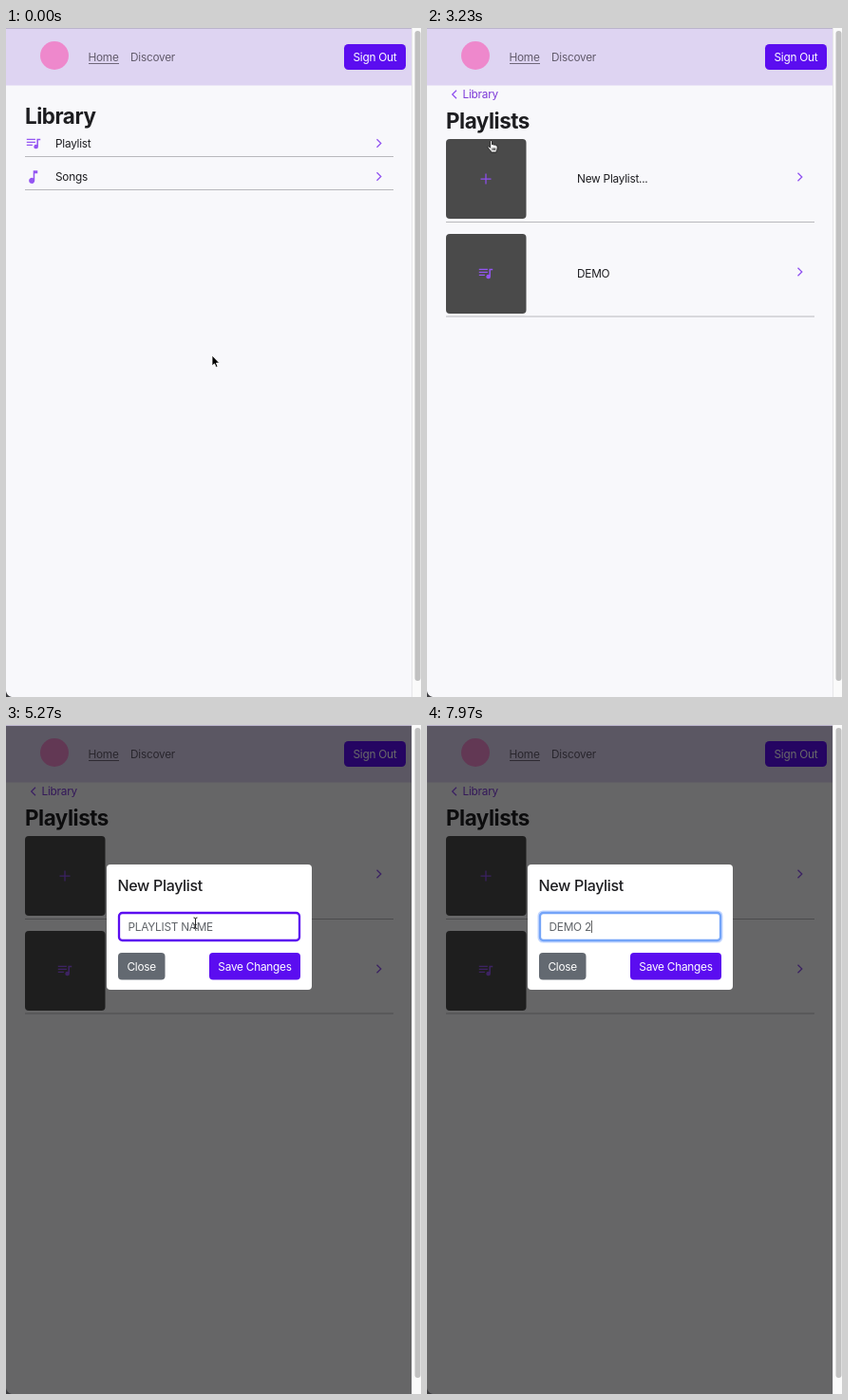
These frames come from a looping animation (437 px wide and 705 px high, 8000 ms). An HTML page:

```html
<!DOCTYPE html>
<html lang="en">
<head>
<meta charset="utf-8">
<title>Music library</title>
<style>
  html, body { margin: 0; width: 100%; height: 100%; overflow: hidden; }
  svg { display: block; width: 437px; height: 705px; }
  text { font: 11.8px Inter, sans-serif; letter-spacing: -.02em; fill: #1d1d20; white-space: pre; }
  .title { font-size: 22.4px; font-weight: 700; }
  .modal-title { font-size: 16px; font-weight: 500; }
  .nav text { fill: #625b6c; }
  text.white { fill: #fff; }
  text.link { fill: #7d3ad8; }
  text.field { fill: #5f6368; }
  .hint { font-size: 10px; }
  .primary { fill: #5b0df0; }
  .icon { fill: #9455f2; }
  .stroke { fill: none; stroke: #8f4ff0; stroke-width: 1.25; }
  .rule { stroke: #b8b8bc; }
  .tile { fill: #4a4a4a; }
</style>
</head>
<body>
<svg viewBox="0 0 437 705">
  <defs>
    <path id="queue" class="icon" transform="scale(.76) translate(-12.5 -13)" d="M15 6H3v1.6h12zM15 10H3v1.6h12zM3 15.6h8V14H3zM17 6v8.2a3 3 0 1 0 2 2.8V8h3V6z"/>
    <path id="note" class="icon" transform="scale(.76) translate(-12 -12)" d="M12 3v10.6a4 4 0 1 0 2 3.4V7h4V3z"/>
    <path id="chevron" class="stroke" d="M-2 -4.3L2.3 0L-2 4.3"/>
    <filter id="shadow" x="-30%" y="-30%" width="160%" height="170%">
      <feDropShadow dx="0" dy="1" stdDeviation="1.5" flood-opacity=".35"/>
    </filter>
  </defs>

  <rect width="437" height="705" fill="#f8f8fb"/>
  <rect width="427" height="60.5" fill="#ded4f2"/>
  <circle cx="51" cy="29" r="15" fill="#ee88cc"/>
  <g class="nav">
    <text x="86.5" y="35">Home</text>
    <path d="M87 37.5H119" stroke="#625b6c" stroke-width=".9"/>
    <text x="131" y="35">Discover</text>
  </g>
  <rect class="primary" x="356" y="17" width="65" height="27" rx="4.5"/>
  <text class="white" x="388.5" y="35" text-anchor="middle">Sign Out</text>

  <g id="library">
    <text class="title" x="20" y="101">Library</text>
    <use href="#queue" x="29" y="122"/>
    <text x="52" y="126">Playlist</text>
    <use href="#chevron" x="392.5" y="121.5"/>
    <path class="rule" d="M20 135.5H408M20 170.5H408"/>
    <use href="#note" x="28.7" y="157"/>
    <text x="52" y="161">Songs</text>
    <use href="#chevron" x="392.5" y="156.5"/>
  </g>

  <g id="playlists">
    <use href="#chevron" transform="translate(29 70) scale(-1 1)"/>
    <text class="link" x="37.5" y="74.3">Library</text>
    <text class="title" x="20" y="105.5">Playlists</text>
    <rect class="tile" x="20" y="117" width="84.5" height="84" rx="4"/>
    <path class="stroke" d="M56.5 159H67.5M62 153.5V164.5"/>
    <text x="158" y="163.4">New Playlist...</text>
    <use href="#chevron" x="392.5" y="157"/>
    <rect class="tile" x="20" y="217" width="84.5" height="84" rx="4"/>
    <use href="#queue" x="62" y="259"/>
    <text x="158" y="263.2">DEMO</text>
    <use href="#chevron" x="392.5" y="257"/>
    <path class="rule" d="M20 204.5H408M20 304H408"/>
  </g>

  <g id="modal">
    <rect width="427" height="705" opacity=".59"/>
    <rect x="106" y="147" width="216" height="132" rx="4" fill="#fff"/>
    <text class="modal-title" x="117.5" y="175">New Playlist</text>
    <rect id="ring" x="116.5" y="195.5" width="195" height="34" rx="5.5" fill="#c2d6ff"/>
    <rect id="input" x="119" y="198" width="190" height="29" rx="3.5" fill="#fff" stroke-width="2.3"/>
    <text id="field" class="field" x="128.5" y="216.7"></text>
    <rect id="caret" y="206" width="1" height="13" fill="#555"/>
    <rect x="118" y="240" width="49.5" height="28.5" rx="4" fill="#636971"/>
    <text class="white" x="142.7" y="258.5" text-anchor="middle">Close</text>
    <rect class="primary" x="214" y="240" width="96" height="28.5" rx="4"/>
    <text class="white" x="262" y="258.5" text-anchor="middle">Save Changes</text>
    <g id="popup">
      <path filter="url(#shadow)" fill="#fff" d="M194 236H201L207 230.5L213 236H242Q245 236 245 239V266Q245 269 242 269H194Q191 269 191 266V239Q191 236 194 236Z"/>
      <text class="hint" x="200.3" y="256">DEMO</text>
    </g>
  </g>

  <path d="M0 .5H427" stroke="#bbb4cc"/>
  <path d="M0 699Q1 704 6 705H0Z" fill="#3a3a3d"/>
  <rect x="427" width="10" height="705" fill="#fafafa"/>
  <path d="M427.5 0V705" stroke="#e6e6e8"/>
  <rect x="430.5" y="3" width="6" height="685" rx="3" fill="#c1c1c1"/>

  <g id="cursor">
    <path id="arrow" d="M0 0V11L2.5 8.8L4.2 12.5L6 11.7L4.4 8.1H7.7Z" fill="#000" stroke="#fff" stroke-width=".8"/>
    <path id="hand" d="M-.9 6V1Q0 -.5 1 1V4.4Q2.2 3.6 3 4.8Q4.2 4.1 4.9 5.3Q6.6 4.8 6.6 6.5V8.5Q6.4 10 5.6 11V12.4H-.2V11.2Q-2 9.6-3.5 7.2Q-3.2 5.5-1.8 6.8L-.9 7.8ZM1.4 7.8V10.5M2.9 7.8V10.5M4.4 7.8V10.5" fill="#fff" stroke="#111" stroke-width=".8" stroke-linejoin="round"/>
    <path id="beam" d="M-2 -5.5Q0 -5.5 0 -4.2Q0 -5.5 2 -5.5M0 -4.5V5M-2 6Q0 6 0 4.7Q0 6 2 6M-1.3 1.8H1.3" fill="none" stroke="#222" stroke-width="1"/>
  </g>
</svg>
<script>
const LOOP = 8000;
const OPEN_LIST = 2900, OPEN_MODAL = 4570, FOCUS = 5750, SUGGEST = 5900, TYPE = 6900, KEY = 200;
const WORD = 'DEMO 2';

// start, end, destination of each pointer move
const START = [217, 345];
const MOVES = [
  [1530, 2330, 72, 134],
  [2370, 2500, 67.5, 118.5],
  [3530, 4200, 191, 157],
  [4600, 5250, 199.5, 208.5]
];

const $ = id => document.getElementById(id);
const show = (id, on) => { $(id).style.display = on ? '' : 'none'; };
const clamp = v => Math.max(0, Math.min(1, v));
const ease = v => v * v * (3 - 2 * v);

function pointer(t) {
  let [x, y] = START;
  for (const [from, to, tx, ty] of MOVES) {
    const k = ease(clamp((t - from) / (to - from)));
    x += (tx - x) * k;
    y += (ty - y) * k;
  }
  return [x, y];
}

function drawCursor(t) {
  const [x, y] = pointer(t);
  const modal = t >= OPEN_MODAL;
  const hand = !modal && y < 171;
  const beam = modal && y > 197;
  show('cursor', t < TYPE);
  show('hand', hand);
  show('beam', beam);
  show('arrow', !hand && !beam);
  $('cursor').setAttribute('transform', `translate(${x} ${y})`);
}

function drawField(t) {
  const count = t < TYPE ? 0 : Math.min(WORD.length, 1 + Math.floor((t - TYPE) / KEY));
  const focus = clamp((t - FOCUS) / 150);
  const mix = (a, b) => Math.round(a + (b - a) * focus);
  $('ring').style.opacity = focus;
  $('input').setAttribute('stroke', `rgb(${mix(91, 116)},${mix(13, 164)},${mix(240, 248)})`);
  $('field').textContent = count ? WORD.slice(0, count) : 'PLAYLIST NAME';
  show('caret', count > 0);
  if (count) $('caret').setAttribute('x', 128.5 + $('field').getComputedTextLength());
  const closing = TYPE + KEY * (WORD.length - 1) - 60;
  $('popup').style.opacity = clamp((t - SUGGEST) / 60) * (1 - clamp((t - closing) / 120));
}

function draw(now) {
  const t = now % LOOP;
  show('library', t < OPEN_LIST);
  show('playlists', t >= OPEN_LIST);
  show('modal', t >= OPEN_MODAL);
  if (t >= OPEN_MODAL) drawField(t);
  drawCursor(t);
}

const began = performance.now();
function frame() {
  draw(performance.now() - began);
  requestAnimationFrame(frame);
}
frame();
</script>
</body>
</html>
```
